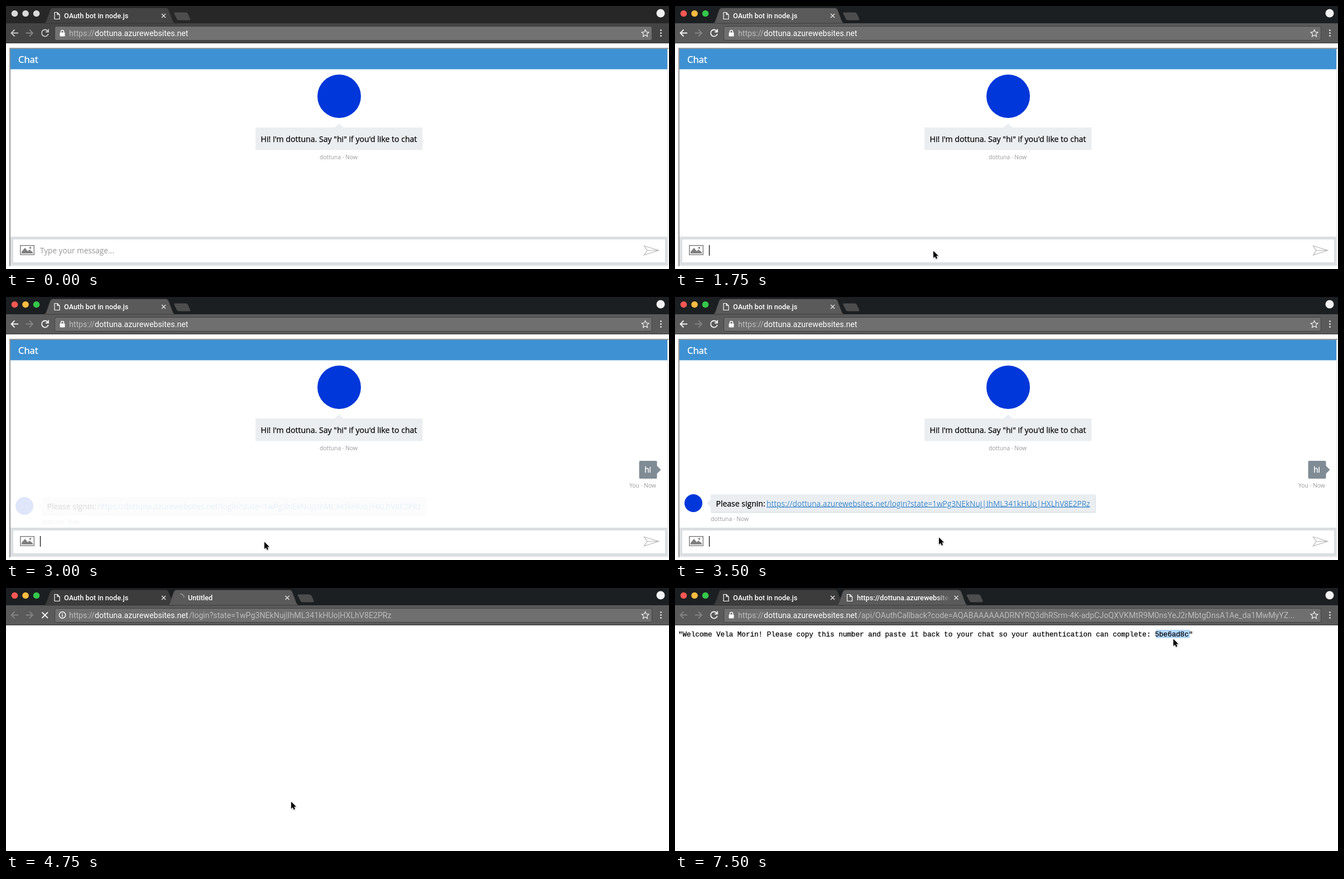
An HTML page that plays this animation: 1188 by 472 pixels, repeating every 8000 ms.

```html
<!DOCTYPE html>
<html lang="en">
<head>
<meta charset="utf-8">
<title>Chat sign-in</title>
<style>
  html, body { margin: 0; width: 100%; height: 100%; overflow: hidden; background: #fff; }
  svg { display: block; width: 1188px; height: 472px;
    --frame: #1c1f21; --bar: #5a5a5a; --field: #6f6f6f; --icon: #f4f4f4; }
  svg.idle { --frame: #272727; --bar: #444; --field: #727272; --icon: #c9c9c9; }
  .ui { font: 14.2px Roboto, "Liberation Sans", sans-serif; }
  .tab { font: 500 12.7px Roboto, "Liberation Sans", sans-serif; fill: #fff; }
  .chat { font: 14px "Open Sans", "Noto Sans", sans-serif; }
  .ink { stroke: #000; stroke-width: .25; }
  .pale { fill: #fff; stroke: #fff; stroke-width: .4; }
  .meta { font-size: 10.3px; fill: #999; }
  .mono { font: 12.6px "Liberation Mono", monospace; }
  .line { fill: none; stroke: var(--icon); stroke-width: 1.8; }
  .dim { stroke: #858585; }
  .idle .light { fill: #dadada; }
  [hidden] { display: none; }
</style>
</head>
<body>
<svg id="stage" viewBox="0 0 1188 472">
  <defs>
    <linearGradient id="fade" gradientUnits="userSpaceOnUse" x1="468" x2="493">
      <stop stop-color="#fff"/><stop offset="1" stop-color="#fff" stop-opacity="0"/>
    </linearGradient>
    <path id="tabShape" d="M68 31 Q71 30 72 27 L79 7 Q80.500 3.500 84 3.500 H286 Q290 3.500 291.500 7 L299 27 Q300 30 303 31Z"/>
    <path id="sheet" d="M87 11.500h5l4 4v8h-9zM92 11.500v4h4" fill="none" stroke="#fff" stroke-width="1.200"/>
    <path id="cross" d="M279 14l7 7m0-7l-7 7" stroke="#ddd" stroke-width="1.500"/>
  </defs>

  <!-- browser window -->
  <rect width="1188" height="31" style="fill:var(--frame)"/>
  <circle class="light" cx="15.500" cy="13.500" r="5.800" fill="#fc5753"/>
  <circle class="light" cx="35" cy="13.500" r="5.800" fill="#fdbc40"/>
  <circle class="light" cx="54.500" cy="13.500" r="5.800" fill="#34c84a"/>
  <circle cx="1173" cy="13" r="7.500" fill="#f2f2f2"/>
  <rect y="31" width="1188" height="36" style="fill:var(--bar)"/>
  <path d="M0 66.500H1188" stroke="#383838"/>
  <use id="tab1" href="#tabShape" stroke="#2a2a2a" stroke-width=".6"/>
  <use href="#sheet"/>
  <text class="tab" x="104" y="21.500">OAuth bot in node.js</text>
  <use href="#cross"/>
  <g id="tab2">
    <use href="#tabShape" x="221.500" fill="#5a5a5a" stroke="#2a2a2a" stroke-width=".6"/>
    <use href="#cross" x="221.500"/>
    <path id="spinner" d="M312 10.500a6.500 6.500 0 0 1 7 7" fill="none" stroke="#999" stroke-width="1.500"/>
    <use id="sheet2" href="#sheet" x="221.500"/>
    <text id="title2" class="tab" x="326" y="21.500" style="fill:url(#fade)"></text>
  </g>
  <path id="plus" d="M303 11.500H322Q325 11.500 326 14L330 23Q331 25.500 328 25.500H310Q307 25.500 306 23L301.500 14Q300.500 11.500 303 11.500Z" fill="#4d4d4d"/>

  <g class="line">
    <path id="back" d="M22 48.500H9.500M15.500 42.500l-6 6 6 6"/>
    <path class="dim" d="M35.500 48.500H48M42 42.500l6 6-6 6"/>
    <path id="reload" d="M75 45.200A6 6 0 1 0 75.800 50M76 41.500V46.500H71"/>
    <path id="stop" d="M64.500 43.500l10.500 10.500m0-10.500l-10.500 10.500"/>
  </g>
  <rect x="87.500" y="36.500" width="1070" height="25" rx="3" style="fill:var(--field)" stroke="#404040"/>
  <g id="lock"><rect x="96.500" y="47.500" width="9" height="7" rx="1" fill="#fff"/>
    <path d="M98.500 48V46a2.500 2.500 0 0 1 5 0v2" fill="none" stroke="#fff" stroke-width="1.500"/></g>
  <g id="info" fill="none" stroke="#fff" stroke-width="1.500"><circle cx="101" cy="48.500" r="5.700"/>
    <path d="M101 45v1.500m0 1.200v4"/></g>
  <text class="ui" y="53.500" fill="#bdbdbd"><tspan x="113">https://</tspan><tspan x="159" fill="#fff">dottuna.azurewebsites.net</tspan><tspan id="path" x="328"></tspan></text>
  <path d="M1145.500 42.500l1.900 4.200 4.500.5-3.400 3 1 4.500-4-2.400-4 2.400 1-4.500-3.400-3 4.500-.5z" fill="none" stroke="#f2f2f2" stroke-width="1.200"/>
  <g fill="#ddd"><circle cx="1173.500" cy="43.500" r="1.500"/><circle cx="1173.500" cy="48.500" r="1.500"/><circle cx="1173.500" cy="53.500" r="1.500"/></g>

  <!-- chat page -->
  <g id="chatPage" class="chat">
    <path d="M7 467V76H1187" fill="none" stroke="#999" stroke-width="2"/>
    <path d="M1186 77V466H8" fill="none" stroke="#ececec" stroke-width="2"/>
    <rect x="8" y="77" width="1177" height="36.500" fill="#3e91d2"/>
    <text class="pale" x="22" y="102" style="font-size:16.500px">Chat</text>
    <circle cx="597" cy="162" r="39" fill="#0037da"/>
    <path d="M447 218H589L597 211L605 218H746.500V258.500H447Z" fill="#ebeef1"/>
    <text class="ink" x="456.500" y="244" style="font-size:14.100px">Hi! I'm dottuna. Say "hi" if you'd like to chat</text>
    <text class="meta" x="562" y="275">dottuna · Now</text>
    <g id="sent">
      <rect x="1134.500" y="294" width="32" height="32" rx="2" fill="#808c95"/>
      <path d="M1166 302.500L1173.500 310L1166 317.500Z" fill="#808c95"/>
      <text class="pale" x="1144" y="315">hi</text>
      <text class="meta" x="1117" y="342">You · Now</text>
    </g>
    <g id="reply">
      <circle cx="33" cy="370" r="16" fill="#0037da"/>
      <rect x="64" y="355" width="690" height="32" rx="2" fill="#d3d7da"/>
      <rect x="64" y="354" width="689.500" height="32" rx="2" fill="#ebeef1"/>
      <path d="M64 363L57 370L64 377Z" fill="#ebeef1"/>
      <text class="ink" x="73.500" y="375.500">Please signin:</text>
      <text id="link" x="164" y="375.500" fill="#3a87cc" style="font-size:13.660px"></text>
      <text class="meta" x="64" y="402">dottuna · Now</text>
    </g>
    <rect x="8" y="414" width="1177" height="51" fill="#dbdee1"/>
    <rect x="13" y="419" width="1168" height="41" fill="#fff"/>
    <rect x="25.800" y="429.800" width="24.500" height="16.500" fill="none" stroke="#888" stroke-width="1.600"/>
    <path d="M28 444V441L34 434L39 440L42 437L48 442V444Z" fill="#808080"/>
    <circle cx="43.500" cy="434" r="1.800" fill="#808080"/>
    <path d="M1143.500 430.500L1169.500 438.500L1143.500 447L1149 438.500ZM1149 438.500H1169" fill="none" stroke="#b4b4b4" stroke-width="1.200"/>
    <text id="hint" x="61" y="444" fill="#959595" style="font-size:13.600px">Type your message...</text>
    <text id="typed" class="ink" x="61" y="444"></text>
    <path id="caret" d="M61.500 429V448" stroke="#000" stroke-width="1.200"/>
  </g>

  <!-- code page -->
  <g id="codePage" class="mono">
    <rect id="mark" x="862" y="75" width="60.500" height="15" fill="#b3d7fe"/>
    <text class="ink" x="6" y="87">"Welcome Vela Morin! Please copy this number and paste it back to your chat so your authentication can complete: 5be6ad8c"</text>
  </g>

  <path id="mouse" d="M0 0V12.500L2.900 9.900L4.900 14.200L7 13.200L5.100 9.100H9Z" stroke="#fff" stroke-width="1" paint-order="stroke" style="filter:drop-shadow(0 1px 1px #0005)"/>
</svg>
<script>
const $ = id => document.getElementById(id);
const show = (id, on) => $(id).toggleAttribute('hidden', !on);
const login = '/login?state=1wPg3NEkNuj|IhML341kHUo|HXLhV8E2PRz';
const callback = '/api/OAuthCallback?code=AQABAAAAAADRNYRQ3dhRSrm-4K-adpCJoQXVKMtR9M0nsYeJ2rMbtgDnsA1Ae_da1MwMyYZ...';
const site = 'https://dottuna.azurewebsites';
$('link').textContent = site + '.net' + login;

// pointer stops: time, x, y
const stops = [
  [250, 690, 250], [500, 640, 300], [750, 575, 360], [1000, 505, 405], [1250, 469, 427],
  [1500, 462, 438], [3500, 472, 430], [3750, 490, 407], [4000, 505, 390], [4250, 510, 382],
  [5000, 512, 350], [5250, 525, 265], [5500, 535, 207], [6000, 746, 153],
  [6250, 815, 125], [6500, 860, 104], [6750, 884, 94], [7000, 892, 90]
];

function draw(t) {
  const newTab = t >= 4750, loaded = t >= 5500, loading = newTab && !loaded;
  const focused = t >= 1750, fading = t < 3250;
  $('stage').classList.toggle('idle', t < 500);

  show('tab2', newTab);
  show('spinner', loading);
  show('sheet2', loaded);
  $('title2').textContent = loaded ? site : 'Untitled';
  $('tab1').style.fill = newTab ? '#3c3c3c' : 'var(--bar)';
  $('plus').setAttribute('transform', `translate(${newTab ? 221.5 : 0})`);
  $('back').classList.toggle('dim', newTab);
  show('reload', !loading);
  show('stop', loading);
  show('lock', !loading);
  show('info', loading);
  $('path').textContent = loaded ? callback : newTab ? login : '';

  show('chatPage', !newTab);
  show('hint', !focused);
  show('caret', focused);
  const text = t >= 2250 && t < 2750 ? 'hi'.slice(0, t < 2500 ? 1 : 2) : '';
  $('typed').textContent = text;
  $('caret').setAttribute('transform', `translate(${[0, 9, 13][text.length]})`);
  show('sent', t >= 2750);
  show('reply', t >= 3000);
  $('reply').setAttribute('opacity', fading ? .12 : 1);
  $('reply').setAttribute('transform', `translate(0 ${fading ? 5 : 0})`);
  $('link').setAttribute('text-decoration', fading ? 'none' : 'underline');

  show('codePage', loaded);
  show('mark', t >= 7500);

  const stop = stops.filter(s => s[0] <= t).pop();
  show('mouse', stop);
  if (stop) $('mouse').setAttribute('transform', `translate(${stop[1] + 1} ${stop[2] + 1.5})`);
}

let last = -1;
function tick() {
  const t = Math.floor(performance.now() % 8000 / 250) * 250;
  if (t !== last) draw(last = t);
  requestAnimationFrame(tick);
}
tick();
</script>
</body>
</html>
```
